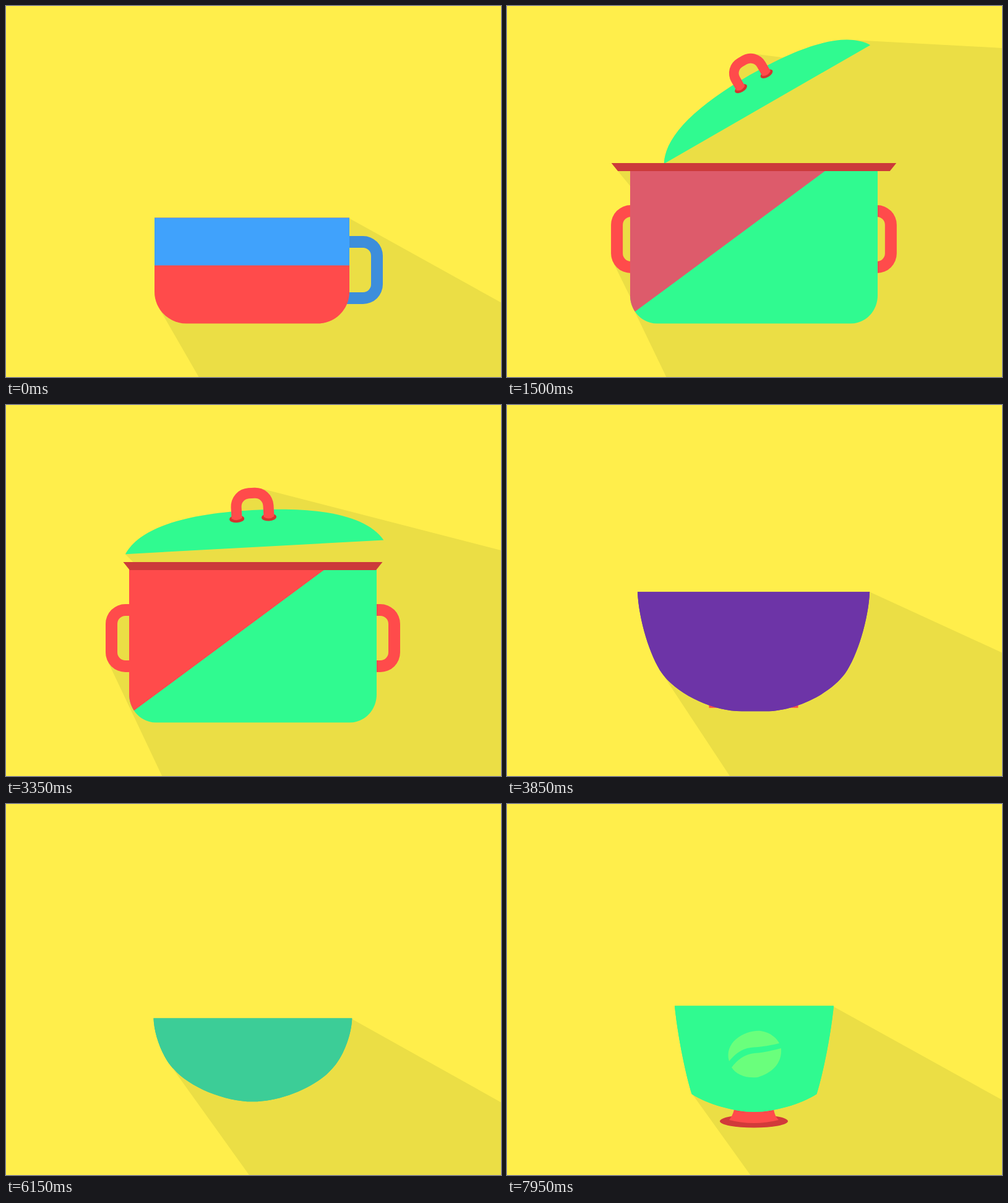
Write an HTML page that moves like this. It is 800 px wide and 600 px high and loops after 8000 ms.

```html
<!DOCTYPE html>
<html lang="en">
<head>
<meta charset="utf-8">
<title>Kitchenware</title>
<style>
  html, body { margin: 0; width: 100%; height: 100%; overflow: hidden; background: #ffee4b; }
  svg { display: block; width: 800px; height: 600px; overflow: hidden; }
</style>
</head>
<body>
<svg viewBox="0 0 800 600" xmlns="http://www.w3.org/2000/svg">
  <defs><clipPath id="bodyClip"><path id="clipShape"/></clipPath></defs>
  <path id="shadow" fill="#ebde45"/>
  <path id="handleL" class="cast" d="M-80-55H-32A32 32 0 0 1 0-23V23A32 32 0 0 1-32 55H-80V36H-32A13 13 0 0 0-19 23V-23A13 13 0 0 0-32-36H-80Z"/>
  <path id="handleR" class="cast" d="M-80-55H-32A32 32 0 0 1 0-23V23A32 32 0 0 1-32 55H-80V36H-32A13 13 0 0 0-19 23V-23A13 13 0 0 0-32-36H-80Z"/>
  <g id="lid">
    <path class="cast" fill="#30fa90" d="M-209 0C-184-41-110-60 0-60S184-41 209 0Z"/>
    <g fill="#d2352f"><ellipse cx="-26" cy="-47" rx="12" ry="6"/><ellipse cx="26" cy="-47" rx="12" ry="6"/></g>
    <path class="cast" fill="#ff4b4b" d="M-34.500-48V-66A30 30 0 0 1-4.500-96H4.500A30 30 0 0 1 34.500-66V-48Q26-42 17.500-48V-66A13 13 0 0 0 4.500-79H-4.500A13 13 0 0 0-17.500-66V-48Q-26-42-34.500-48Z"/>
  </g>
  <path id="rice" class="cast" fill="#fff" d="M220 307A27 27 0 0 1 261 277C255 230 290 222 324 244A40.600 40.600 0 0 1 399 238A27 27 0 0 1 446 244A30 30 0 0 1 495 259A32 32 0 0 1 543 282A23 23 0 0 1 577 307Z"/>
  <path id="stickL" class="cast" fill="#ffa077" d="M521 117L541 125L464 295L443 295Z"/>
  <path id="stickR" class="cast" fill="#ffa077" d="M578 117L598 125L490 299L472 300Z"/>
  <path id="riceFront" fill="#fff" d="M440 307V262Q460 267 465 283Q473 280 479 287Q490 279 503 283V307Z"/>
  <path id="cream" class="cast" fill="#fff" d="M260 358C255 325 275 308 300 300C318 294 322 288 321 275C317 258 322 245 338 238C362 228 385 222 400 212C412 205 416 198 409 188C438 190 456 212 446 247C440 268 460 274 485 277C520 286 551 305 536 358Z"/>
  <circle id="cherry" class="cast" cx="454.5" r="30.300" fill="#ef234b"/>
  <path id="foot" class="cast" fill="#ff4b4b"/>
  <g id="stand">
    <ellipse id="plate" class="cast" cx="399" cy="513" fill="#d13a3a"/>
    <path class="cast" fill="#ff4b4b" d="M368 470C370 490 366 503 359 511Q399 521 439 511C431 503 429 490 431 470Z"/>
  </g>
  <path id="body" class="cast"/>
  <path id="band" clip-path="url(#bodyClip)"/>
  <path id="bean" fill="#6aff7c" d="M359 416C350 385 385 365 410 367C426 369 437 380 440 387C420 392 405 393 394 394C378 396 368 405 359 416ZM363 426C372 414 383 405 400 403C418 402 430 398 443 395C445 420 428 435 405 442C385 444 370 437 363 426Z"/>
  <path id="rim" class="cast" fill="#cc3a3a"/>
</svg>
<script>
const LOOP = 8000;
const LIGHT = { x: -20, y: 24 };
const REACH = 7;
const MORPH = 650;
const MORPH_STARTS = [50, 3400, 5750, 7300];
const RED = [255, 75, 75], BLUE = [64, 162, 252], GREEN = [48, 250, 144], PURPLE = [100, 51, 173];

// Centre x, then the right half: rim, side corner, shoulder, belly corner, base.
const VESSELS = [
  [397.5, [157.5, 342.5], [157.5, 402], [157.5, 462], [157.5, 513.5], [106.5, 513.5]],
  [399, [200, 266], [200, 367], [200, 468], [200, 513.5], [157, 513.5]],
  [398.5, [186, 307], [182, 385], [141, 430], [90, 494], [0, 493]],
  [399, [153, 358], [152, 402], [124, 428], [80, 478], [0, 478]],
  [399.5, [128.5, 326.5], [121, 405], [101, 469], [58, 498], [0, 498]]
];

const el = {};
document.querySelectorAll('svg [id]').forEach(node => el[node.id] = node);
const casters = [...document.querySelectorAll('.cast')];
const changing = [el.body, el.rim, el.foot, el.plate];

const set = (node, name, value) => node.setAttribute(name, value);
const show = (node, visible) => { node.style.display = visible ? '' : 'none'; };
const clamp = u => Math.min(1, Math.max(0, u));
const lerp = (a, b, u) => Array.isArray(a) ? a.map((v, i) => lerp(v, b[i], u)) : a + (b - a) * u;
const rgb = c => `rgb(${c.map(Math.round)})`;

const progress = (t, start, time) => clamp((t - start) / time);
const hump = u => Math.sin(Math.PI * u);
const cubic = u => u < .5 ? 4 * u ** 3 : 1 - 4 * (1 - u) ** 3;
const backOut = u => 1 + 2.7 * (u - 1) ** 3 + 1.7 * (u - 1) ** 2;
const backIn = u => 1 - backOut(1 - u);
const ramp = (t, start, time) => cubic(progress(t, start, time));

// Grows from 0 past 1, rests at 1, then winds up and drops back to 0.
const stay = (t, start, grow, end, drop) =>
  backOut(progress(t, start, grow)) - backIn(progress(t, end, drop));

function bodyPath([cx, ...corners], squash) {
  const [rim, side, shoulder, belly, base] = corners;
  const floor = base[1];
  const round = (from, corner) => lerp(from, corner, .55);
  const half = [rim, round(rim, side), round(shoulder, side), shoulder,
    round(shoulder, belly), round(base, belly), base];
  const place = (points, sign) => points.map(([x, y]) =>
    `${cx + sign * x * (1 + squash)} ${floor + (y - floor) * (1 - squash)}`).join(' ');
  return `M${place([rim], -1)}L${place([rim], 1)}C${place(half.slice(1), 1)}` +
    `L${place([base], -1)}C${place(half.reverse().slice(1), -1)}Z`;
}

function outline(node) {
  if (node.points) return node.points;
  const length = node.getTotalLength(), count = Math.ceil(length / 4);
  const points = Array.from({ length: count + 1 }, (_, i) => node.getPointAtLength(length * i / count));
  if (!changing.includes(node)) node.points = points;
  return points;
}

// Sweeps an outline away from the light; every quad gets the same winding.
function sweep(node) {
  const m = node.getCTM();
  const points = outline(node).map(({ x, y }) => [m.a * x + m.c * y + m.e, m.b * x + m.d * y + m.f]);
  const far = ([x, y]) => [LIGHT.x + (x - LIGHT.x) * REACH, LIGHT.y + (y - LIGHT.y) * REACH];
  const text = ([x, y]) => x.toFixed(1) + ' ' + y.toFixed(1);
  let d = '';
  for (let i = 1; i < points.length; i++) {
    let a = points[i - 1], b = points[i];
    const turn = (b[0] - a[0]) * (a[1] - LIGHT.y) - (b[1] - a[1]) * (a[0] - LIGHT.x);
    if (turn < 0) [a, b] = [b, a];
    d += 'M' + [a, b, far(b), far(a)].map(text).join('L') + 'Z';
  }
  return d;
}

function drawBody(t, morphs) {
  const vessel = VESSELS.reduce((shape, next, i) => lerp(shape, next, morphs[i - 1]));
  const squash = .13 * MORPH_STARTS.reduce((sum, start) => sum + hump(progress(t, start, 400)), 0);
  const [cx, [width, rimY]] = vessel;
  const floor = vessel[5][1];
  const path = bodyPath(vessel, squash);
  set(el.body, 'd', path);
  set(el.clipShape, 'd', path);

  let tint = lerp(BLUE, RED, ramp(t, 50, 2250));
  tint = lerp(tint, PURPLE, ramp(t, 3400, 600));
  tint = lerp(tint, GREEN, morphs[2]);
  set(el.band, 'fill', rgb(tint));
  set(el.body, 'fill', rgb(lerp(lerp(RED, GREEN, morphs[0]), tint, morphs[1])));

  const [left, right] = lerp(lerp([419.5, 419.5], [647.5, 55], morphs[0]), [1250, 700], morphs[1]);
  set(el.band, 'd', `M0 0H800V${right}L0 ${left}Z`);
  return { cx, half: width * (1 + squash), top: floor + (rimY - floor) * (1 - squash) };
}

function drawPot(t, { cx, half, top }, morphs) {
  const cupGrip = 1 - backIn(progress(t, 0, 300));
  const potGrip = stay(t, 1360, 500, 3400, 250);
  const reach = half - 20 + 74 * cupGrip + 58 * potGrip;
  for (const [node, side] of [[el.handleL, -1], [el.handleR, 1]]) {
    set(node, 'transform', `translate(${cx + side * reach} ${lerp(427, 377, morphs[0])})scale(${side} 1)`);
    set(node, 'fill', t < 300 ? '#3d8edb' : '#ff4b4b');
    show(node, potGrip > .001 || side > 0 && cupGrip > .001);
  }

  const rim = 209.5 * stay(t, 900, 1000, 3400, 300);
  const inner = Math.max(0, rim - 10.5);
  set(el.rim, 'd', `M${cx - rim} ${top - 12}H${cx + rim}L${cx + inner} ${top + 1}H${cx - inner}Z`);
  show(el.rim, rim > .1);

  // One wide flight out of the pot, then short hops that tip to either side.
  const flight = progress(t, 1000, 1000);
  const opening = hump(flight ** .4) / hump(.5 ** .4);
  const hops = progress(t, 2450, 1000) * 2;
  const hop = hump(hops % 1), side = hops < 1 ? 1 : -1;
  const gone = backIn(progress(t, 3450, 300));
  const x = 399 + 21.5 * opening - 4.5 * side * hop;
  const y = 254 - 95 * opening - 41.5 * hop + 240 * gone;
  set(el.lid, 'transform', `translate(${x} ${y})rotate(${5.34 * side * hop - 30 * opening})` +
    `scale(${flight ** .12 * (1 - .45 * gone)})`);
  show(el.lid, t > 1000 && t < 3750);
}

function drawRice(t, top) {
  const rice = stay(t, 4000, 600, 5700, 350);
  for (const node of [el.rice, el.riceFront]) {
    set(node, 'transform', `translate(0 ${top})scale(1 ${rice})translate(0 -307)`);
    show(node, rice > .001);
  }
  const sticks = [
    [el.stickL, stay(t, 4250, 850, 5750, 350), .43],
    [el.stickR, stay(t, 3900, 600, 5700, 350), .5]
  ];
  for (const [node, raised, slope] of sticks) {
    const drop = 215 * (1 - raised);
    set(node, 'transform', `translate(${-slope * drop} ${.9 * drop})`);
    show(node, raised > .001);
  }
  const foot = ramp(t, 3700, 300) - ramp(t, 5700, 300);
  set(el.foot, 'd', `M326.500 440H470.500V${465 + 48.5 * foot}H326.500Z`);
  show(el.foot, foot > .001);
}

function drawDessert(t, top, morphs) {
  const stand = stay(t, 6200, 400, LOOP, 1);
  set(el.stand, 'transform', `translate(0 ${-45 * (1 - stand)})`);
  set(el.plate, 'rx', stand * lerp(65.5, 55, morphs[3]));
  set(el.plate, 'ry', stand * lerp(12, 10.5, morphs[3]));
  show(el.stand, stand > .001);

  const cream = stay(t, 6380, 1000, 7380, 300);
  set(el.cream, 'transform', `translate(0 ${top})scale(1 ${cream})translate(0 -358)`);
  show(el.cream, cream > .001);

  const toss = progress(t, 7380, 350);
  set(el.cherry, 'cy', top + 80 * toss - 81.5 * cream - 126 * hump(toss));
  show(el.cherry, cream > .001 || toss > 0 && toss < 1);

  const bean = backOut(progress(t, 7550, 350));
  set(el.bean, 'transform', `translate(400 404)scale(${bean})translate(-400 -404)`);
  show(el.bean, bean > .001);
}

function draw(t) {
  const morphs = MORPH_STARTS.map(start => ramp(t, start, MORPH));
  const body = drawBody(t, morphs);
  drawPot(t, body, morphs);
  drawRice(t, body.top);
  drawDessert(t, body.top, morphs);

  const visible = node => node.style.display !== 'none' && node.parentNode.style.display !== 'none';
  set(el.shadow, 'd', casters.filter(visible).map(sweep).join(''));
}

const start = performance.now();
function frame() {
  draw((performance.now() - start) % LOOP);
  requestAnimationFrame(frame);
}
draw(0);
requestAnimationFrame(frame);
</script>
</body>
</html>
```
